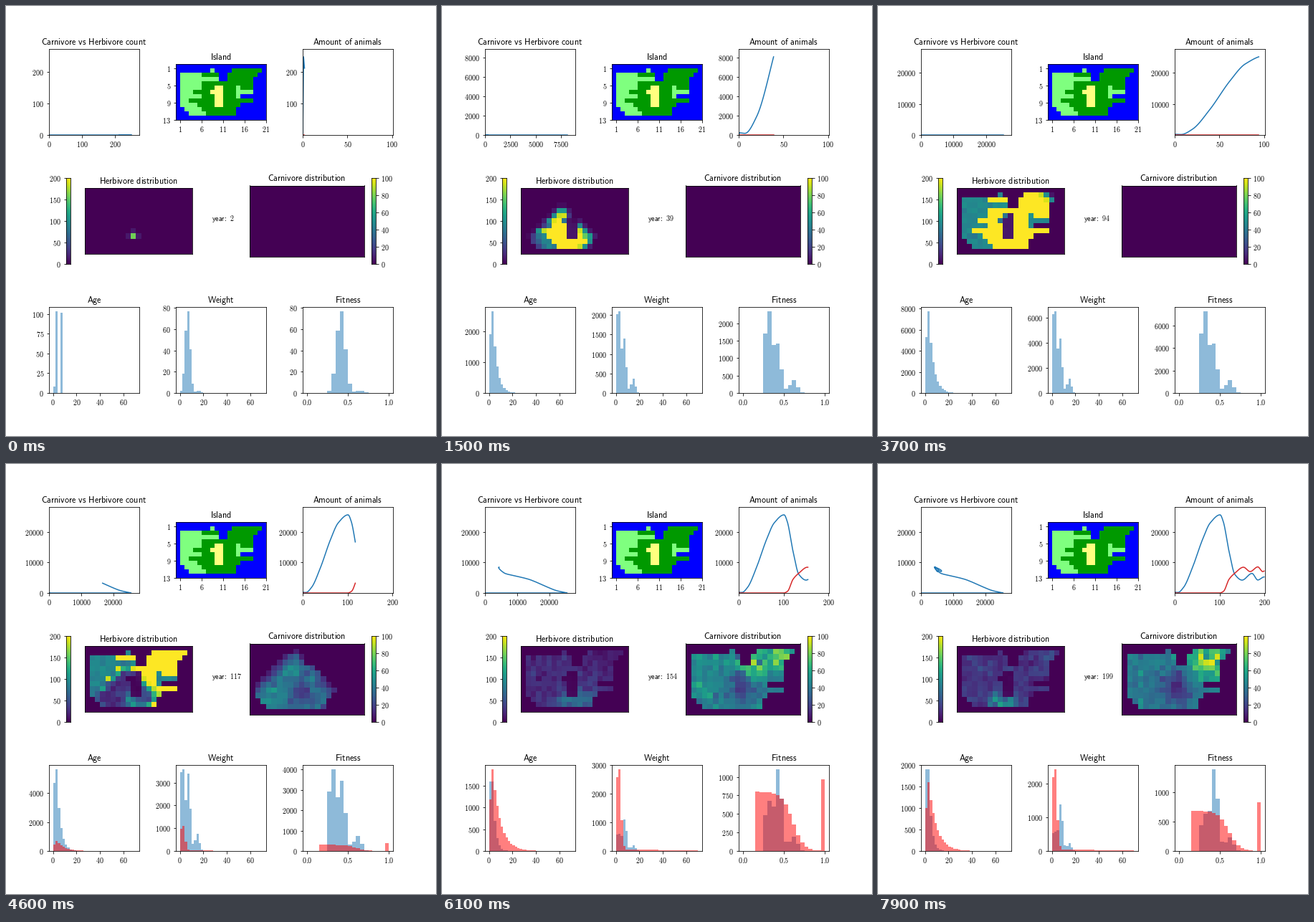
Recreate the animation shown at these times as a matplotlib script. Size 600 by 600 pixels, loop 8 s.

```python
import numpy as np
import matplotlib.pyplot as plt
from matplotlib.animation import FuncAnimation
from matplotlib.colors import ListedColormap
from matplotlib.ticker import FuncFormatter, MaxNLocator

plt.rcParams.update({"mathtext.fontset": "cm", "font.size": 10, "axes.titlesize": 12})
SIZE, FRAMES, INTERVAL = 600, 80, 100
ROWS, COLS = 13, 21
STEPS = [1, 2, 2.5, 5, 10]
SPACE = r"\hspace{0.38}"

fig = plt.figure(figsize=(SIZE / 72, SIZE / 72), dpi=72, facecolor="white")


def sans(text):
    return r"$\mathsf{" + text.replace(" ", SPACE) + "}$"


def panel(x, y, w, h, title=""):
    ax = fig.add_axes([x / SIZE, 1 - (y + h) / SIZE, w / SIZE, h / SIZE])
    if title:
        ax.set_title(sans(title))
    for axis in (ax.xaxis, ax.yaxis):
        axis.set_major_formatter(FuncFormatter(lambda v, _: f"${v:g}$"))
    return ax


def ramp(x, start, end):
    return np.clip((x - start) / (end - start), 0, 1)


def mix(a, b, t):
    return a + (b - a) * t


# ---- population counts -------------------------------------------------
YEARS = np.arange(201)


def smooth_curve(points):
    """Monotone cubic through the key points, flat at every turning point."""
    t, v = np.array(points, float).T
    step = np.diff(t)
    slope = np.diff(v) / step
    before, after = slope[:-1], slope[1:]
    product = before * after
    tangent = np.zeros(len(t))
    rising = product > 0
    tangent[1:-1][rising] = 2 * product[rising] / (before + after)[rising]
    i = np.clip(np.searchsorted(t, YEARS, "right") - 1, 0, len(step) - 1)
    s = np.clip((YEARS - t[i]) / step[i], 0, 1)
    ease = s * s * (3 - 2 * s)
    return (mix(v[i], v[i + 1], ease)
            + step[i] * s * (1 - s) * ((1 - s) * tangent[i] - s * tangent[i + 1]))


herb_count = smooth_curve([
    (2, 212), (7, 172), (20, 1900), (39, 8100), (62, 17500), (79, 22900), (101, 25550),
    (108, 23400), (121, 13570), (134, 6050), (150, 4210), (172, 6400), (185, 4250), (199, 5250)])
herb_count[:2] = 0, 248
carn_count = smooth_curve([
    (100, 0), (109, 600), (121, 4500), (134, 6500), (153, 8430), (168, 7000),
    (185, 8530), (196, 7000), (200, 7200)])


# ---- histograms: share of the population in each bin -------------------
def bump(k, center, width):
    return np.exp(-((k - center) / width) ** 2 / 2)


def age_shares(young, decay):
    shares = decay ** (np.arange(35) - 1.0)
    shares[0] = young
    return shares / shares.sum()


def herb_ages(year):
    settled = age_shares(mix(mix(.72, .68, ramp(year, 39, 94)), 1, ramp(year, 102, 134)),
                         mix(mix(.57, .61, ramp(year, 39, 94)), .43, ramp(year, 102, 134)))
    # two founding cohorts grow older together while newborns take over
    k, shift = np.arange(35), (year - 2) // 2
    cohorts = .49 * (k == 1 + shift) + .48 * (k == 3 + shift) + .04 * (k == 0)
    return mix(cohorts, settled, ramp(year, 2, 16))


def herb_traits(year, bins, first, newborn):
    """Newborn, adult and old groups; `first` is the lowest bin in use."""
    k = np.arange(bins) - first
    late = ramp(year, 102, 134)
    young = mix(.3, .19, late) - .07 * ramp(year, 134, 174)
    adult = mix(.17, .24, late) + .03 * ramp(year, 134, 174)
    grown = (young * bump(k, newborn, .83) + adult * bump(k, mix(3, 3.2, late), .83)
             + .045 * bump(k, 6.9, .9))
    founders = .37 * bump(k, 2.8, 1.05) + .01 * bump(k, 7.5, .8)
    return mix(founders, grown, ramp(year, 2, 16)) * (k >= 0)


def carn_weights():
    k = np.arange(35)
    return .365 * bump(k, .6, .95) + .0065 * (1 - k / 55)


def carn_fitness():
    k = np.arange(20)
    return .095 * (k >= 3) / (1 + np.exp((k - 11.7) / 1.3)) + .115 * (k == 19)


HERB_SHARES = [herb_ages,
               lambda year: herb_traits(year, 35, 0, .5),
               lambda year: herb_traits(year, 20, 5, .7)]
CARN_SHARES = [age_shares(.63, .74), carn_weights(), carn_fitness()]

# ---- island ------------------------------------------------------------
WATER, HIGHLAND, LOWLAND, DESERT = range(4)
island = np.full((ROWS, COLS), WATER)


def paint(kind, top, bottom, left, right):
    island[top:bottom + 1, left:right + 1] = kind


paint(LOWLAND, 2, 11, 1, 13)
for r in range(1, 5):                          # north-eastern cape
    paint(LOWLAND, r, r, 13, max(17, 20 - r))
for r in (5, 8):                               # eastern arms
    paint(LOWLAND, r, r, 14, 17)
paint(LOWLAND, 9, 9, 14, 14)
paint(WATER, 2, 3, 10, 11)
paint(HIGHLAND, 1, 1, 8, 8)
paint(HIGHLAND, 2, 7, 1, 5)
paint(HIGHLAND, 3, 3, 6, 9)
paint(LOWLAND, 6, 6, 4, 5)
paint(HIGHLAND, 8, 8, 1, 2)
for r in range(9, 12):                         # south-western slope
    paint(HIGHLAND, r, r, r - 8, r - 5)
    paint(WATER, r, r, 0, r - 9)
paint(HIGHLAND, 5, 7, 14, 14)
paint(HIGHLAND, 6, 6, 14, 17)
paint(DESERT, 5, 9, 9, 10)
paint(DESERT, 6, 6, 8, 8)

water, desert = island == WATER, island == DESERT
row_i, col_i = np.mgrid[:ROWS, :COLS]
distance = abs(col_i - 7.5) + abs(row_i - 9.5)
capacity = np.choose(island, [0, 92, 240, 12])
capacity = np.where(desert & (row_i < 7) & (col_i + row_i != 15) & (row_i + col_i < 16),
                    75, capacity)
settled_year = 6 + 4.6 * distance
hunted_year = 104 + 2.1 * distance


def blob(x, y, s):
    return bump(col_i, x, s) * bump(row_i, y, s)


cape = blob(16, 2, 2.5)
HERB_MAPS = [
    20 + 60 * blob(8.5, 11, 1.8),
    32 + 100 * blob(12, 10, 1.5) - 22 * cape,
    30 + 70 * blob(8.5, 11, 1.8) + 15 * blob(17, 1, 1.3)]
CARN_MAPS = [
    48 + 50 * blob(12, 4, 1.5) - 24 * blob(9, 9, 2.5),
    48 + 60 * blob(16, 1.2, 2.4) - 28 * blob(10, 7, 2) - 15 * blob(15, 7, 2),
    42 + 43 * blob(15.5, 3, 2.2) - 26 * blob(10, 8, 2.3)]


def drift(year, maps):
    return mix(mix(maps[0], maps[1], ramp(year, 134, 174)), maps[2], ramp(year, 174, 199))


def distribution(year):
    rng = np.random.default_rng(year)

    def rough(amount):
        return rng.normal(1, amount, (ROWS, COLS))

    start = 157 * (distance == 2) * (col_i == 9) * (row_i == 9)
    start = start + 13 * (abs(col_i - 9) + abs(row_i - 9) == 1) * (row_i < 10)
    herbs = capacity * rough(.06) * ramp(year, settled_year, settled_year + 13)
    herbs = np.maximum(herbs, start * np.exp(-(year - 2) / 5))
    grazed = drift(year, HERB_MAPS) * rough(.25) * np.where(desert, .08, 1)
    herbs = mix(herbs, grazed, ramp(year, hunted_year - 3, hunted_year + 3))

    carns = drift(year, CARN_MAPS) * rough(.14) * np.where(desert, .75, 1)
    carns = carns * ramp(year, hunted_year - 8, hunted_year + 1)
    herbs[water] = carns[water] = 0
    return herbs, carns


# ---- panels ------------------------------------------------------------
phase_ax = panel(60, 60, 126, 120, "Carnivore vs Herbivore count")
phase_ax.xaxis.set_major_locator(MaxNLocator(4, steps=STEPS))
phase_ax.yaxis.set_major_locator(MaxNLocator(5, steps=STEPS))
phase_line, = phase_ax.plot([], [], color="tab:blue")

island_ax = panel(237, 81, 126, 78, "Island")
island_ax.imshow(island, cmap=ListedColormap([(0, 0, 1), (.5, 1, .5), (0, .6, 0), (1, 1, .5)]),
                 extent=(0, COLS, ROWS, 0), aspect="auto", interpolation="nearest")
xt, yt = range(1, 22, 5), range(1, 14, 4)
island_ax.set_xticks(xt, [sans(str(v)) for v in xt])
island_ax.set_yticks(yt, [sans(str(v)) for v in yt])

count_ax = panel(414, 60, 126, 120, "Amount of animals")
herb_line, = count_ax.plot([], [], color="tab:blue")
carn_line, = count_ax.plot([], [], color="tab:red")


def heatmap(x, y, w, h, title, top):
    ax = panel(x, y, w, h, title)
    ax.set_xticks([])
    ax.set_yticks([])
    return ax.imshow(np.zeros((ROWS, COLS)), vmin=0, vmax=top, cmap="viridis",
                     aspect="auto", interpolation="nearest")


def color_scale(x, top, step, side):
    ax = panel(x, 240, 6, 120)
    ax.imshow(np.arange(256)[:, None], cmap="viridis", origin="lower",
              extent=(0, 1, 0, top), aspect="auto")
    ax.set_xticks([])
    ax.set_yticks(range(0, top + 1, step))
    ax.yaxis.set_ticks_position(side)


herb_image = heatmap(110, 253.6, 150, 92.86, "Herbivore distribution", 200)
carn_image = heatmap(340, 250.5, 160, 99.05, "Carnivore distribution", 100)
color_scale(84, 200, 50, "left")
color_scale(510, 100, 20, "right")
year_label = fig.text(287 / SIZE, .5, "", va="baseline")

hist_axes, herb_bars, carn_bars = [], [], []
for left, title, top, bins, ticks in [(60, "Age", 70, 35, (0, 20, 40, 60)),
                                      (237, "Weight", 70, 35, (0, 20, 40, 60)),
                                      (414, "Fitness", 1, 20, (0, .5, 1))]:
    ax = panel(left, 420, 126, 120, title)
    edges = np.linspace(0, top, bins + 1)
    for color, group in (("tab:blue", herb_bars), ("red", carn_bars)):
        group.append(ax.stairs(np.zeros(bins), edges, fill=True, color=color,
                               alpha=.5, linewidth=0, snap=True))
    ax.set_xlim(-.05 * top, 1.05 * top)
    ax.set_xticks(ticks)
    ax.yaxis.set_major_locator(MaxNLocator(5, steps=STEPS))
    hist_axes.append(ax)
hist_axes[2].xaxis.set_major_formatter(FuncFormatter(lambda v, _: f"${v:.1f}$"))


def update(frame):
    year = 2 + 5 * frame // 2
    t, herbs, carns = YEARS[:year + 1], herb_count[:year + 1], carn_count[:year + 1]
    limit = 1.1 * herbs.max()

    phase_line.set_data(herbs, carns)
    phase_ax.set_xlim(0, limit)
    phase_ax.set_ylim(0, limit)

    herb_line.set_data(t, herbs)
    carn_line.set_data(t, carns)
    span = 100 if year <= 100 else 200
    count_ax.set_xlim(0, span + 1)
    count_ax.set_xticks((0, span // 2, span))
    ticks = MaxNLocator(5, steps=STEPS).tick_values(0, limit)
    power_of_ten = np.log10(ticks[1]) % 1 < 1e-6
    count_ax.set_yticks([v for v in ticks if v <= limit and (v > 0 or not power_of_ten)])
    count_ax.set_ylim(0, limit)

    herb_map, carn_map = distribution(year)
    herb_image.set_data(herb_map)
    carn_image.set_data(carn_map)
    year_label.set_text(sans(rf"year\!: {year}"))

    for i, ax in enumerate(hist_axes):
        blue = herb_count[year] * HERB_SHARES[i](year)
        red = carn_count[year] * CARN_SHARES[i]
        herb_bars[i].set_data(blue)
        carn_bars[i].set_data(red)
        ax.set_ylim(0, 1.05 * max(blue.max(), red.max()))
    return []


anim = FuncAnimation(fig, update, frames=FRAMES, interval=INTERVAL,
                     init_func=lambda: [], repeat=True, repeat_delay=0, blit=False)
plt.show()
```
